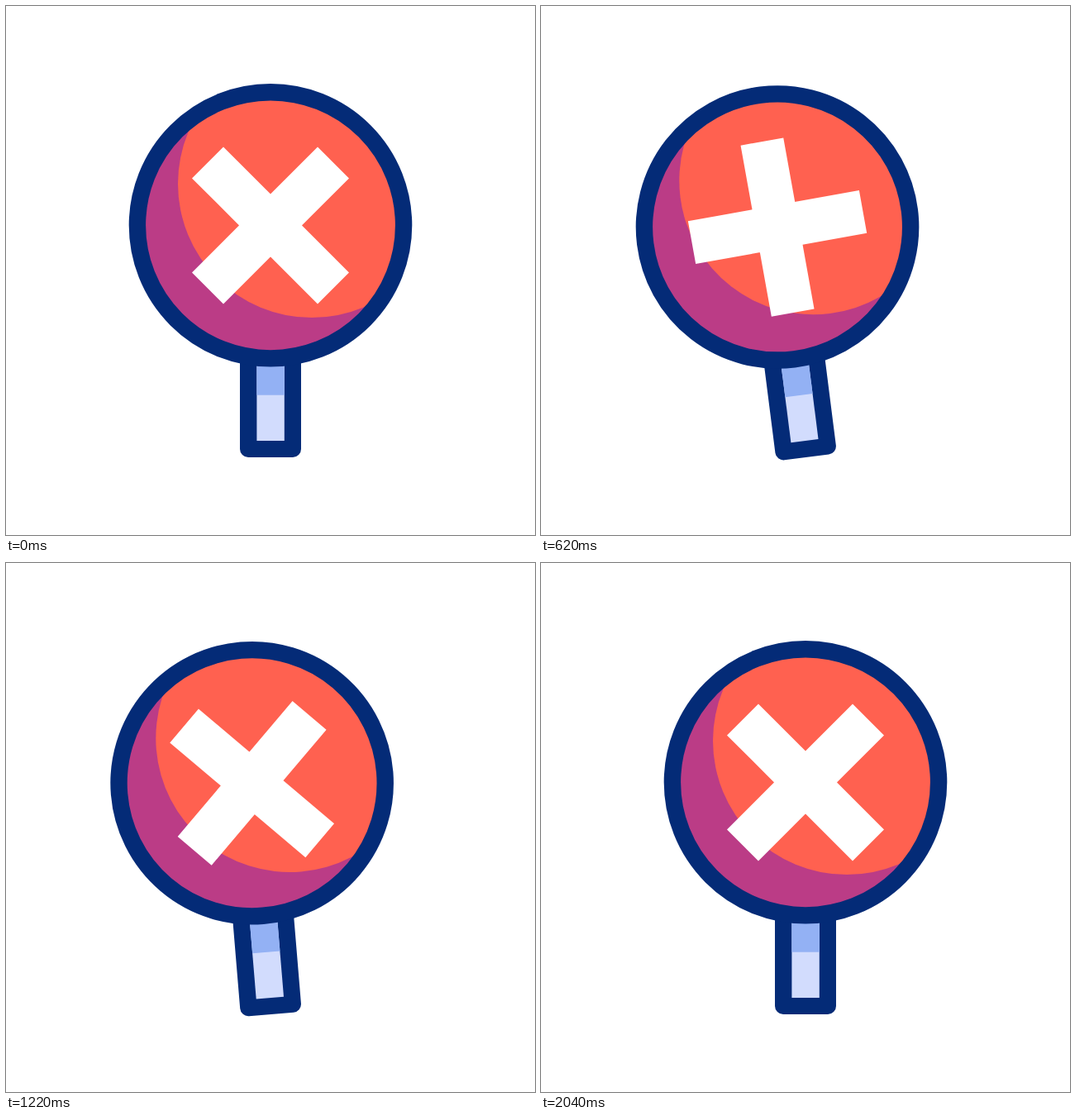
Write an HTML page that moves like this. It is 640 px wide and 640 px high and loops after 3 s.

```html
<!DOCTYPE html>
<html>
<head>
<meta charset="utf-8">
<style>
  html, body { margin: 0; width: 100%; height: 100%; overflow: hidden; background: #fff; }
  svg { display: block; width: 100%; height: 100%; }
</style>
</head>
<body>
<svg viewBox="0 0 640 640">
  <clipPath id="disc"><circle cx="320" cy="265.3" r="156"/></clipPath>
  <g id="sign">
    <rect x="283" y="400" width="74" height="146" rx="10" fill="#042b77"/>
    <rect x="303.4" y="420" width="33.4" height="106" fill="#d2dcfd"/>
    <rect x="303.4" y="420" width="33.4" height="50.7" fill="#93b1f4"/>
    <g clip-path="url(#disc)">
      <circle cx="320" cy="265.3" r="156" fill="#bb3c86"/>
      <circle cx="370" cy="215" r="162" fill="#ff6150"/>
    </g>
    <circle cx="320" cy="265.3" r="161.1" fill="none" stroke="#042b77" stroke-width="20.4"/>
    <path id="cross" d="M-76-76L76 76M-76 76L76-76" stroke="#fff" stroke-width="53.7"/>
  </g>
</svg>
<script>
const LOOP = 3000, STEP = 20;
const sign = document.getElementById('sign');
const cross = document.getElementById('cross');

// Keys are [time, value] pairs.
const tilt = [[0, 0], [424, -14.2], [926, 8.4], [1300, -6], [1693, 2.6], [1885, -1.1], [2040, 0]];
const spin = [[0, 0], [424, 30], [1200, -360]];
const size = [[0, 1], [424, 0.86], [800, 1.08], [1200, 1]];

// Cubic bezier easing with control points (a, 0) and (b, 1).
function ease(x, a, b) {
  let lo = 0, hi = 1;
  for (let i = 0; i < 24; i++) {
    const s = (lo + hi) / 2, r = 1 - s;
    if (3 * r * r * s * a + 3 * r * s * s * b + s * s * s < x) lo = s; else hi = s;
  }
  return lo * lo * (3 - 2 * lo);
}

function valueAt(keys, t, a = 0.45, b = 0.55) {
  const i = keys.findIndex(k => k[0] > t);
  if (i < 0) return keys[keys.length - 1][1];
  const [t0, v0] = keys[i - 1], [t1, v1] = keys[i];
  return v0 + (v1 - v0) * ease((t - t0) / (t1 - t0), a, b);
}

function draw(now) {
  const t = Math.floor(now % LOOP / STEP) * STEP;
  sign.setAttribute('transform', `rotate(${valueAt(tilt, t)} 320 535)`);
  cross.setAttribute('transform',
    `translate(320 265.4) rotate(${valueAt(spin, t, 0.38, 0.355)}) scale(${valueAt(size, t)})`);
}

const start = performance.now();
function tick() {
  draw(performance.now() - start);
  requestAnimationFrame(tick);
}
tick();
</script>
</body>
</html>
```
